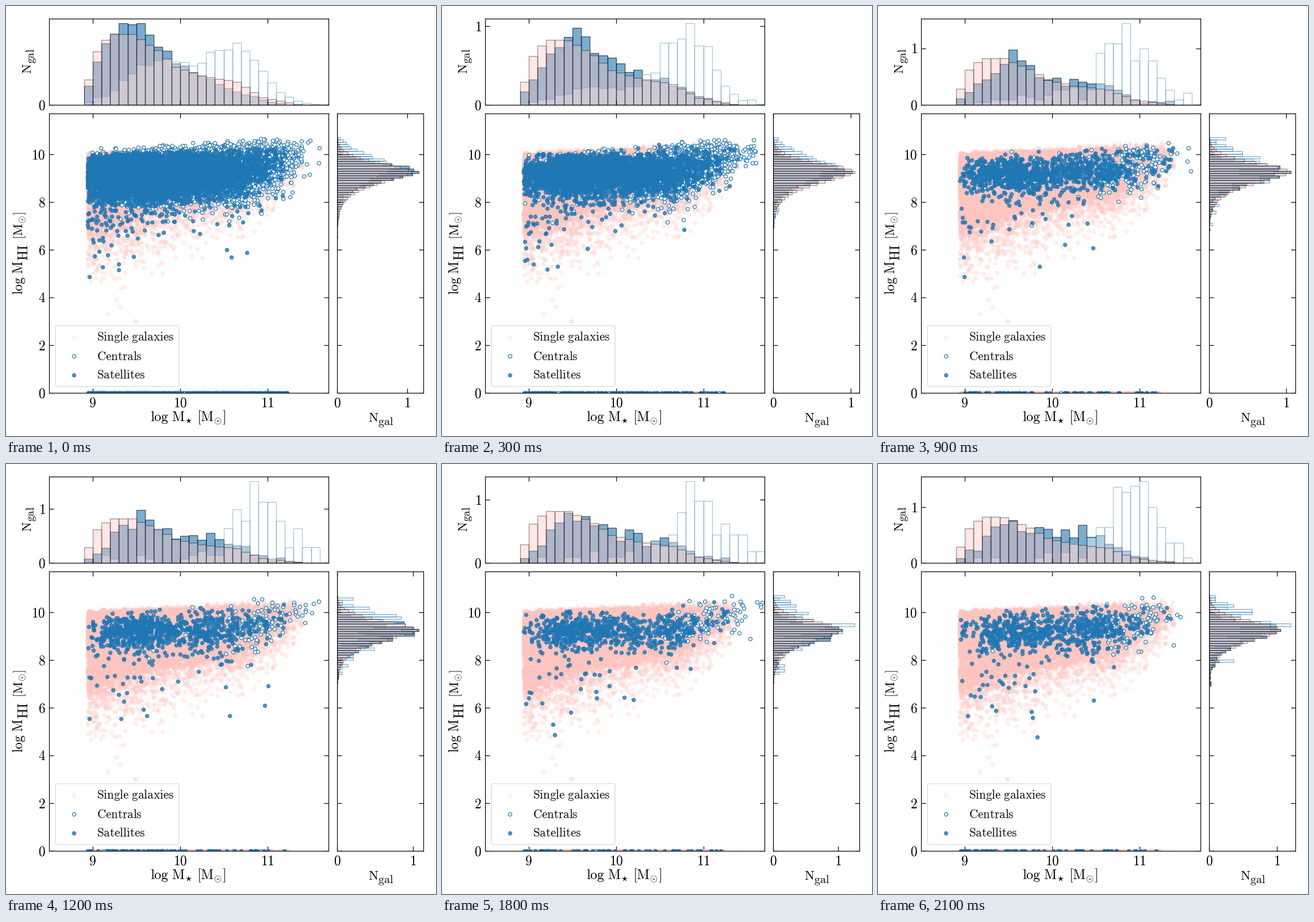
Recreate the animation shown at these times as a matplotlib script. Size 748 px wide and 748 px high, loop 2400 ms.

```python
import numpy as np
import matplotlib.pyplot as plt
from matplotlib.animation import FuncAnimation
from matplotlib.patches import FancyBboxPatch

plt.rcParams.update({"mathtext.fontset": "cm", "font.family": "DejaVu Serif"})

SIZE, DPI = 748, 64
PX = 72 / DPI
FRAMES, STEP_MS = 8, 300
BLUE, PINK = "#1f77b4", "#ffc4be"
BIN = np.arange(28)
MASS = 8.9 + 0.1 * BIN
DEPTH = 0.1 * np.arange(60, 116)


def curve(*knots):
    """Bar heights through a few (bin, height) knots."""
    return np.interp(BIN, *zip(*knots))


SINGLE_MASS = curve((0, .29), (1, .62), (2, .75), (3, .825), (5, .82), (8, .63),
                    (10, .44), (13, .34), (17, .265), (20, .09), (24, .01), (25, 0))
SAT_EARLY = curve((0, .21), (2, .7), (4, .94), (5, .98), (7, .885), (8, .7),
                  (10, .51), (12, .39), (16, .2), (20, .06), (23, 0))
SAT_LATE = curve((0, .08), (2, .27), (4, .55), (6, .87), (9, .58), (13, .47),
                 (16, .42), (18, .28), (20, .12), (24, .03), (25, 0))
CEN_PLATEAU = curve((0, .04), (3, .17), (6, .46), (9, .52), (13, .35), (20, 0))


def settle(i, rate):
    return 1 - np.exp(-rate * i)


def count_noise(rng, h, n):
    """Densities in 0.1 wide bins, as n counted objects would give them."""
    return rng.poisson(h * n / 10) * 10 / n


def with_peak(h, at, peak):
    h = np.minimum(h, 0.94 * peak)
    h[at] = peak
    return h


def sat_mass(rng, i, n):
    b = settle(i, 0.65)
    return np.minimum(count_noise(rng, (1 - b) * SAT_EARLY + b * SAT_LATE, n), 0.98)


def cen_mass(rng, i, n):
    b, t = settle(i, 1), i / (FRAMES - 1)
    mid, width = 17.5 + 3.2 * np.sqrt(t), 2.8 + 0.5 * t
    bump = (0.55 + 0.5 * b) * np.exp(-0.5 * ((BIN - mid) / width) ** 2)
    h = count_noise(rng, (1 - 0.85 * b) * CEN_PLATEAU + bump, n)
    peak = np.interp(i, (0, 1, 2, 4, 6, 7), (.72, 1.04, 1.38, 1.52, 1.3, 1.47))
    at = int(np.interp(i, (0, 1, 6, 7), (17, 19, 19, 21)))
    return with_peak(h, at, peak)


def depth_hist(base, mid, up, down):
    d = DEPTH + 0.05 - mid
    h = base * np.exp(-np.where(d > 0, (np.abs(d) / up) ** 1.8,
                                (np.abs(d) / down) ** 1.45))
    return np.where(DEPTH < 10.7, h, 0)


def sat_depth(rng, i, n):
    peak = np.interp(i, (0, 1, 4, 7), (1.168, 1.02, 1.08, 1.05))
    h = depth_hist(peak, 9.25, 0.48 - 0.01 * i, 0.56 + 0.02 * i)
    return with_peak(count_noise(rng, h, n), 32, peak)


def cen_depth(rng, i, n):
    peak = np.interp(i, (0, 4, 6, 7), (.82, .9, 1.26, 1.207))
    h = depth_hist(0.78, 9.45, 0.7, 0.85)
    return with_peak(count_noise(rng, h, n), 34, peak)


def cloud(rng, n, heights, slope, drop, lift=0.0):
    """Random points under the mass bars, spread up to a soft ceiling."""
    bins = rng.choice(BIN, n, p=heights / heights.sum())
    u = rng.random(n)
    x = np.where(bins == 0, 8.94 + 0.06 * u, MASS[bins] + 0.1 * u)
    mode = 9.2 + 0.07 * (x - 9) + np.clip(x - 10.7, 0, None)
    cap = 10.05 + lift + 0.2 * (x - 9)
    high = mode + (cap - mode) * rng.beta(1, slope, n)
    low = mode - drop * rng.gamma(1 / 1.45, 1, n) ** (1 / 1.45)
    y = np.where(rng.random(n) < 0.42, high, low) + rng.normal(0, 0.05, n)
    return x, y


def tail(rng, n, start, fall, spread):
    """Sparse gas-poor points, mostly at low mass."""
    x = 8.94 + spread * rng.gamma(1, 1, n)
    y = start + 0.25 * (x - 9) - rng.exponential(fall, n)
    keep = (x < 11.1) & (y > 4.6)
    return x[keep], y[keep]


def zeros(rng, n):
    return 8.94 + 2.3 * rng.beta(1, 1.25, n), np.zeros(n)


def join(*groups):
    return np.hstack(groups)


def single_cloud():
    rng = np.random.default_rng(5)
    strays = 9.15 + 0.42 * rng.random(7), 2.95 + 1.5 * rng.random(7)
    return join(cloud(rng, 30000, SINGLE_MASS, 1.9, 0.68),
                tail(rng, 1300, 7.7, 0.75, 0.45), zeros(rng, 600), strays)


def make_step(i):
    rng = np.random.default_rng(40 + i)
    n_sat = int(700 + 8300 * np.exp(-i))
    n_cen = int(110 + 6900 * np.exp(-1.35 * i))
    sat, cen = sat_mass(rng, i, n_sat), cen_mass(rng, i, n_cen)
    return dict(
        sat=join(cloud(rng, n_sat, sat, 2.6, 0.54),
                 tail(rng, 22 + n_sat // 150, 7.4, 0.8, 0.7),
                 zeros(rng, 40 + n_sat // 45)),
        cen=join(cloud(rng, n_cen, cen, 2.2, 0.58, 0.2),
                 zeros(rng, 3 + n_cen // 60)),
        mass=(sat, cen, SINGLE_MASS),
        depth=(sat_depth(rng, i, n_sat), cen_depth(rng, i, n_cen), SINGLE_DEPTH),
    )


SINGLE_DEPTH = depth_hist(1.055, 9.25, 0.55, 0.69)
steps = [make_step(i) for i in range(FRAMES)]

fig = plt.figure(figsize=(SIZE / DPI, SIZE / DPI), dpi=DPI, facecolor="white")
main = fig.add_axes([0.1, 0.1, 0.65, 0.65])
top = fig.add_axes([0.1, 0.77, 0.65, 0.2])
side = fig.add_axes([0.77, 0.1, 0.2, 0.65])
page = fig.add_axes([0, 0, 1, 1], zorder=5)
page.set(xlim=(0, SIZE), ylim=(SIZE, 0))
page.axis("off")


def ticks(axis, values, labels=True):
    axis.set_ticks(values, [f"${v}$" if labels else "" for v in values])


for ax in (main, top, side):
    ax.tick_params(direction="in", top=True, right=True, length=8 * PX,
                   width=1.2 * PX, labelsize=23.3 * PX)
    ax.tick_params(axis="x", pad=7.5 * PX)
    ax.tick_params(axis="y", pad=6 * PX)
    for spine in ax.spines.values():
        spine.set_linewidth(1.2 * PX)
main.set(xlim=(8.5, 11.7), ylim=(0, 11.7))
top.set_xlim(8.5, 11.7)
side.set_ylim(0, 11.7)
ticks(main.xaxis, [9, 10, 11])
ticks(main.yaxis, range(0, 11, 2))
ticks(top.xaxis, [9, 10, 11], False)
ticks(top.yaxis, [0, 1])
ticks(side.xaxis, [0, 1])
ticks(side.yaxis, range(0, 11, 2), False)


def write(x, y, s, size, rotation=0, ha="left"):
    page.text(x, y, rf"$\mathrm{{{s}}}$", size=size * PX, rotation=rotation,
              rotation_mode="anchor", ha=ha, va="baseline")


write(317, 722, r"log\ M_{\star}\ [M_{\odot}]", 24, ha="center")
write(29, 502, r"log\ M", 23.5, 90)
write(38, 443, "HI", 24, 90)
write(29, 406, r"[M_{\odot}]", 23, 90)
write(630, 723, "N", 22.8)
write(647, 729, "gal", 20)
write(44, 118, "N", 22.8, 90)
write(49, 100, "gal", 19, 90)

dot = dict(ls="", marker="o", markersize=6.2 * PX, markeredgewidth=1.2 * PX)
styles = dict(
    single=dict(dot, color=PINK, alpha=0.25),
    cen=dict(dot, markerfacecolor="white", markeredgecolor=BLUE),
    sat=dict(dot, color=BLUE, alpha=0.8),
)
main.plot(*single_cloud(), zorder=1.6, **styles["single"])
points = {k: main.plot([], [], zorder=z, **styles[k])[0]
          for k, z in (("cen", 1.7), ("sat", 1.8))}

page.add_patch(FancyBboxPatch((90, 560), 207, 98, boxstyle="round,pad=4",
                              fc="white", ec="#cccccc", alpha=0.8, lw=1.2 * PX))
for k, y, name in (("single", 576, r"Single\ galaxies"),
                   ("cen", 609, "Centrals"), ("sat", 642, "Satellites")):
    page.plot([118.5], [y], **styles[k])
    write(158, y + 6.5, name, 21)

bar_styles = [
    dict(fc=BLUE, ec="black", alpha=0.6),
    dict(fc="white", ec=BLUE, alpha=0.4),
    dict(fc=PINK, ec="black", alpha=0.4),
]
bars = []


def update(i):
    step = steps[i]
    for group in bars:
        group.remove()
    bars.clear()
    for k, line in points.items():
        line.set_data(*step[k])
    for m, d, style in zip(step["mass"], step["depth"], bar_styles):
        thick = (2 if style["fc"] == "white" else 1.2) * PX
        bars.append(top.bar(MASS, m, 0.1, align="edge", lw=1.3 * PX, **style))
        bars.append(side.barh(DEPTH, d, 0.1, align="edge", lw=thick, **style))
    top.set_ylim(0, 1.05 * np.max(step["mass"]))
    side.set_xlim(0, 1.05 * np.max(step["depth"]))
    return []


anim = FuncAnimation(fig, update, frames=FRAMES, interval=STEP_MS,
                     init_func=lambda: update(0), repeat=True, repeat_delay=0)
plt.show()
```
